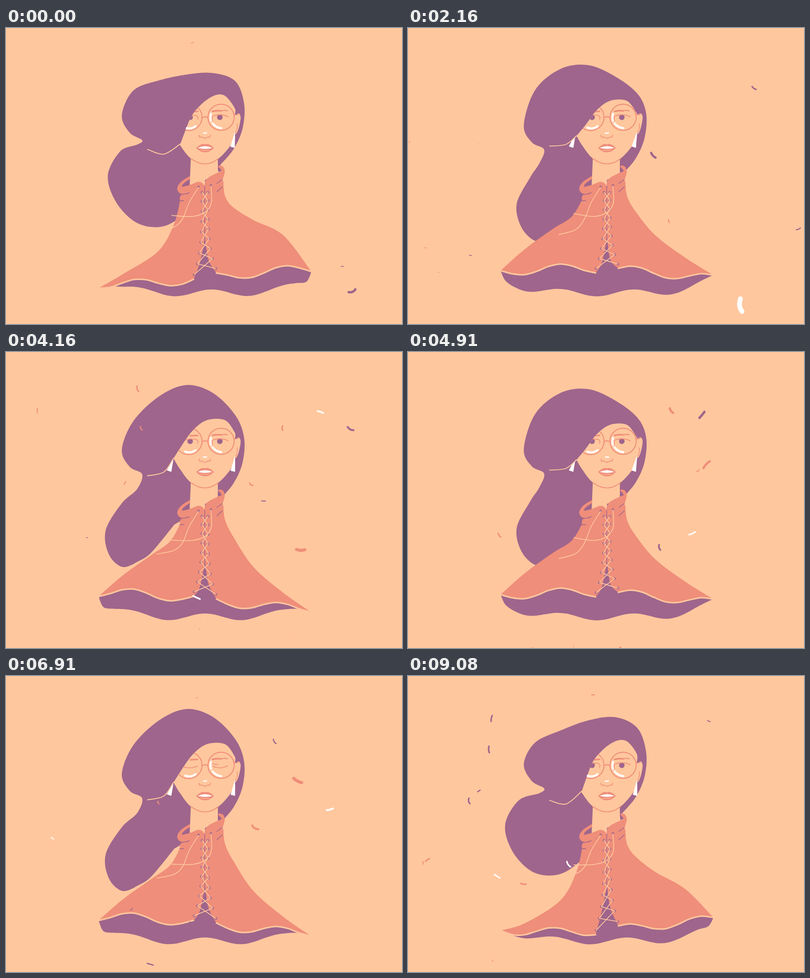
Write an HTML page with a canvas that moves like this. It is 800 px wide and 600 px high and loops after 9160 ms.

```html
<!DOCTYPE html>
<html lang="en">
<head>
<meta charset="utf-8">
<title>Windy cape</title>
<style>
html, body { margin: 0; width: 100%; height: 100%; overflow: hidden; background: #ffc79e; }
canvas { display: block; width: 100vw; height: 100vh; }
</style>
</head>
<body>
<canvas id="stage" width="800" height="600"></canvas>
<script>
const ctx = document.getElementById('stage').getContext('2d');
const SKIN = '#ffc79e', PLUM = '#9f658c', CORAL = '#ef8e7a', WHITE = '#ffffff';
const LOOP = 9160, FRAMES = 110, CYCLE = 11;
ctx.lineCap = ctx.lineJoin = 'round';

const cosDeg = deg => Math.cos(deg * Math.PI / 180);
const range = (n, make) => Array.from({ length: n }, (_, i) => make(i));
const points = text => text.split(' ').map(p => p.split(',').map(Number));

// Rest shapes; the wind moves their points.
const HAIR = points('434,287 460,256 478,214 481,164 463,119 418,89 364,81 308,97 257,132 234,188 250,223 275,238 265,258 234,280 206,332 218,383 252,416 292,414 325,395 375,340');
const FRINGE = points('345,225 364,187 386,158 413,139 442,139 462,164');
const JAW = points('463,176 470,173 474,181 471,200 466,213 461,217 455,236 430,264 402,275 373,264 352,238');

// Catmull-Rom splines, each run joined to the one before by a line.
function spline(path, pts, join) {
  path[join ? 'lineTo' : 'moveTo'](...pts[0]);
  for (let i = 0; i < pts.length - 1; i++) {
    const p = pts[i - 1] || pts[i], q = pts[i], r = pts[i + 1], u = pts[i + 2] || r;
    path.bezierCurveTo(q[0] + (r[0] - p[0]) / 6, q[1] + (r[1] - p[1]) / 6,
      r[0] - (u[0] - q[0]) / 6, r[1] - (u[1] - q[1]) / 6, ...r);
  }
  return path;
}
const curve = (...runs) => runs.reduce((path, pts, i) => spline(path, pts, i > 0), new Path2D());
const shape = path => path instanceof Path2D ? path : new Path2D(path);
function fill(path, color) {
  ctx.fillStyle = color;
  ctx.fill(shape(path));
}
function line(path, color, width = 1.6) {
  ctx.strokeStyle = color;
  ctx.lineWidth = width;
  ctx.stroke(shape(path));
}
function dot(x, y, r, color) {
  ctx.fillStyle = color;
  ctx.beginPath();
  ctx.arc(x, y, r, 0, 7);
  ctx.fill();
}

// The cloth: a short ripple running left over a slow rise and fall.
const ripple = (x, turn) => cosDeg((x - 489) * 360 / 148 + 2 * turn);
const hemY = (x, turn) => 503 + 16 * cosDeg(turn + .4 * x - 87) + 9 * ripple(x, turn);
const liningY = (x, turn) => Math.max(hemY(x, turn),
  537 - 30 * ((x - 402) / 215) ** 4 + 7 * ripple(x, turn));

// Crown points roll one after another; the loose lower lobe swings widest.
function hairAt(turn) {
  return HAIR.map(([x, y], i) => {
    const crown = i > 3 && i < 9;
    const lift = crown ? 14 : 11 + 22 * (i > 11 ? Math.max(0, Math.sin((i - 11) * Math.PI / 6)) : 0);
    const lag = crown ? 145 - 64 * (i - 4) : 170;
    const swing = i > 12 ? 14 + 3.5 * (i - 13) : 0;
    return [x + swing * cosDeg(turn - 105 + 14 * (i - 13)), y + lift * cosDeg(turn - lag)];
  });
}
const fringeAt = turn => FRINGE.map(([x, y], i) =>
  [x + (i < 4 ? 7 * cosDeg(turn) : 0), y + 10 * cosDeg(turn - (i ? 100 : 0))]);

function drawFeatures(closed) {
  const lids = closed
    ? 'M358 184Q372 189 387 183M418 183Q432 190 448 182M417 177Q422 181 428 179'
    : 'M360 179Q374 174 386 178Q389 181 387 185M417 188Q415 179 419 178Q434 173 449 180';
  if (!closed) {
    dot(372, 181, 5.6, PLUM);
    dot(432, 181, 5.6, PLUM);
  }
  line(lids, CORAL);
  line('M372 170L387 169M417 169Q428 167 435 168', CORAL, 3.2);
  line('M435 168Q442 166 447 168', CORAL, 2);
  line('M414 174Q412 181 414 188M417 193Q424 202 435 203M362 202Q374 206 383 199', WHITE, 4);
  line('M396 181a27 27 0 1 1-54 0a27 27 0 1 1 54 0M461 181a26.5 26.5 0 1 1-53 0a26.5 26.5 0 1 1 53 0M396 182Q402 178 408 182M460 176L469 175', CORAL, 2);
  line('M390 217Q389 223 396 221Q402 226 408 221Q414 223 413 217', CORAL);
  line('M399 213H405', WHITE, 2.6);
  fill('M384 243Q396 232 402 236Q409 232 420 243Q412 252 402 252Q392 252 384 243Z', CORAL);
  fill('M387 243Q402 236 417 243Q402 247 387 243Z', WHITE);
  line('M394 247.500Q402 249 410 247.500', SKIN, 1);
}

function drawHead(turn, closed) {
  const fringe = fringeAt(turn);
  fill(curve(hairAt(turn)), PLUM);
  fill('M374 250H428V296L402 308V326L386 314L371 319Z', SKIN);
  if (turn > 50 && turn < 280) fill('M336 219L338 219L334 243L325 240Z', WHITE);

  const face = curve([...fringe, ...JAW, fringe[0]]);
  fill(face, SKIN);
  const strand = [[286, 247 + 11 * cosDeg(turn - 265)], [319, 248 + 12 * cosDeg(turn + 50)], fringe[0]];
  fill(curve(strand, [fringe[1]]), PLUM);
  line(curve(strand), SKIN, 1.8);

  ctx.save();
  ctx.clip(face);
  drawFeatures(closed);
  ctx.restore();
  line('M374 265Q402 286 429 265', CORAL);
  line('M467 194Q469 205 463 213', CORAL, 1.4);

  ctx.save();
  ctx.translate(463, 212);
  ctx.rotate((3.5 + 4 * cosDeg(turn - 90)) * Math.PI / 180);
  fill('M0 0L1 31L-8 29L-1 0Z', WHITE);
  ctx.restore();
}

function drawLaces(turn) {
  const side = dir => range(9, i => {
    const k = i / 8, end = hemY(402 + dir * 22, turn) - 9;
    return [402 + dir * (6 + 16 * k ** 4), 333 + (end - 333) * k ** 1.06];
  });
  const left = side(-1), right = side(1);
  for (const [x, y] of [...left, ...right]) {
    dot(x, y, 2.6, PLUM);
    dot(x, y, 1, CORAL);
  }
  for (let i = 0; i < 8; i++) {
    line(curve([left[i], right[i + 1]]), SKIN);
    line(curve([right[i], left[i + 1]]), SKIN);
  }
  const sway = cosDeg(turn - 90);
  dot(389, 322, 2.3, PLUM);
  dot(414, 319, 2.3, PLUM);
  line(curve([[389, 323], [370, 354], [357, 386], [339, 404 + 6 * sway], [305, 412 + 9 * sway]]), SKIN);
  line(curve([[414, 320], [415, 354], [403, 373], [376, 382], [335, 380 - 5 * sway]]), SKIN);
}

function drawCape(turn) {
  const hemPoint = x => [x, hemY(x, turn)];
  const hemL = range(9, i => hemPoint(187 + 24 * i));
  const hemR = range(9, i => hemPoint(425 + 24 * i));
  const lining = range(21, i => 197 + 20.5 * i).map(x => [x, liningY(x, turn)]);
  const apex = [402, 425];
  fill(curve([hemL[0], ...lining, hemR[8]], [...hemR].reverse(), [apex], [...hemL].reverse()), PLUM);

  const droop = cosDeg(turn + 25), pull = cosDeg(turn - 200);
  const edgeL = [[352, 348], [335 + 5 * droop, 390 + 8 * droop],
    [300 + 8 * droop, 430 + 25 * droop], [237, 473 + 28 * droop], hemL[0]];
  const edgeR = [hemR[8], [560, 453 + 35 * pull], [500, 412 + 24 * pull],
    [460, 370 + 6 * pull], [443, 342], [439, 314]];
  fill(curve(edgeL, hemL, [hemL[8], [392, 475], apex], [apex, [409, 470], hemR[0]],
    hemR, edgeR, [[402, 322]]), CORAL);
  line(curve(hemL), SKIN, 3);
  line(curve(hemR), SKIN, 3);

  fill('M428 279L429 292L437 289L436 281Z', PLUM);
  fill('M372 300Q344 314 346 328Q350 337 356 336Q349 342 352 350L401 420V320Q396 310 386 312Q372 319 356 322Q353 317 372 306Z', CORAL);
  fill('M429 279Q441 277 442 291Q441 300 437 308Q442 314 437 322L439 334L401 420V320Q401 306 414 300Q428 293 436 290Q432 283 429 282Z', CORAL);
  line('M352 337Q361 338 370 334M351 350L359 350M426 315L437 307M426 332L437 322', PLUM, 1.4);
  line('M401.500 321V430', PLUM, 1.3);
  drawLaces(turn);
}

// Confetti: short strokes, larger towards the right, carried left by the wind.
let seed = 41;
const random = () => (seed = seed * 16807 % 2147483647) / 2147483647;
const LIFE = 9;
const confetti = range(190, i => {
  const x = random() * 900, near = random() * x / 800;
  return {
    x, y: random() * 600, born: random() * FRAMES - 1.5,
    length: 4 + random() * 8 + 16 * near, width: 2.5 + 7 * near * near,
    angle: random() * 100 - 25, bend: random() - .5, drop: random() * 20 - 8,
    speed: 18 + 30 * near, color: [PLUM, CORAL, CORAL, PLUM, WHITE][i % 5],
  };
});

function drawConfetti(step) {
  for (const c of confetti) {
    const age = step - c.born;
    if (age < 0 || age > LIFE) continue;
    const scale = Math.sin(Math.PI * (age + .4) / (LIFE + .8));
    const half = c.length * scale / 2, bow = c.bend * half * .7;
    ctx.save();
    ctx.translate(c.x - c.speed * age, c.y + c.drop * age);
    ctx.rotate(-(c.angle + age * c.bend * 40) * Math.PI / 180);
    line(`M${-half} ${bow}Q0 ${-bow} ${half} ${bow}`, c.color, c.width * scale);
    ctx.restore();
  }
}

function draw(now) {
  // Twelve drawings a second, on a 10 ms clock.
  const clock = Math.floor(now % LOOP / 10) * 10;
  const step = Math.min(FRAMES - 1, Math.floor((clock + 9.9) * 12 / 1000));
  const turn = step % CYCLE * 360 / CYCLE;
  fill('M0 0H800V600H0Z', SKIN);
  drawHead(turn, step >= 81 && step <= 84);
  drawCape(turn);
  drawConfetti(step);
}

const start = performance.now();
(function tick() {
  draw(performance.now() - start);
  requestAnimationFrame(tick);
})();
</script>
</body>
</html>
```
